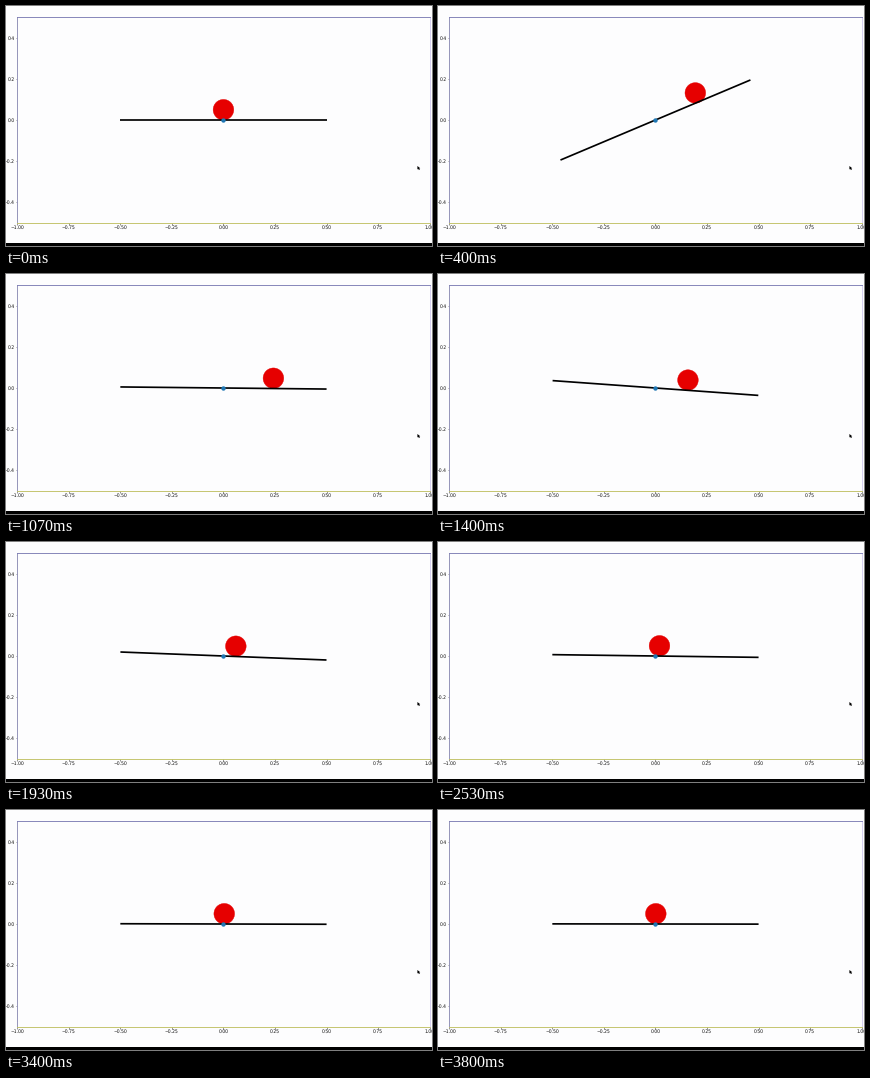
Recreate the animation shown at these times as a matplotlib script. Size 426x240 px, loop 3870 ms.

```python
import numpy as np
import matplotlib.pyplot as plt
from matplotlib.animation import FuncAnimation
from matplotlib.patches import Circle, Polygon, Rectangle

plt.rcParams["text.hinting"] = "no_hinting"

W, H, DPI = 426, 240, 100
FRAMES, LOOP = 58, 3870
STEP = LOOP / FRAMES
PX = 72 / DPI  # points per pixel
PAPER = "#fdfdfe"

# Ball on a beam: kicked once, then balanced by a limited PD controller
PULL = 5.2
KP, KD, LIMIT = 1.99, 1.42, 0.4
KICK_TIME, KICK_SPEED = 0.17, 1.146
HALF, RADIUS = 0.5, 0.05


def simulate():
    """Return the ball's place along the beam and the tilt for each frame."""
    sub = 60
    dt = STEP / 1000 / sub
    kick = round(KICK_TIME / dt)
    s = v = 0.0
    states = []
    for i in range(FRAMES * sub):
        if i == kick:
            v += KICK_SPEED
        tilt = np.clip(KP * s + KD * v, -LIMIT, LIMIT)
        if i % sub == 0:
            states.append((s, tilt))
        v -= PULL * np.sin(tilt) * dt
        s += v * dt
    return states


def number(digits):
    return lambda x, pos: f"{x:.{digits}f}".replace("-", "\u2212")


def px(x, y):
    return x / W, 1 - y / H


states = simulate()

fig = plt.figure(figsize=(W / DPI, H / DPI), dpi=DPI, facecolor=PAPER)
left, right, top, bottom = 11.2, 423.7, 11.2, 216.8
ax = fig.add_axes([left / W, 1 - bottom / H, (right - left) / W, (bottom - top) / H])
ax.set(xlim=(-1, 1), ylim=(-0.5, 0.5), facecolor=PAPER)
ax.set_xticks(np.linspace(-1, 1, 9))
ax.set_yticks([-0.4, -0.2, 0, 0.2, 0.4])
ax.xaxis.set_major_formatter(number(2))
ax.yaxis.set_major_formatter(number(1))
ax.tick_params(length=1.5 * PX, width=0.5 * PX, pad=1.0 * PX,
               labelsize=4.5 * PX, color="#303030", labelcolor="#101010")
for side, color in dict(top="#7c7cb4", left="#8c8cb4",
                        right="#d2ccee", bottom="#c0c064").items():
    ax.spines[side].set(color=color, linewidth=0.9 * PX)

# Window edge and mouse pointer
fig.add_artist(Rectangle((0, 0), 1, 3 / H, transform=fig.transFigure, color="black", lw=0))
pointer = [(411.4, 160.0), (414.2, 162.2), (413.2, 162.6), (413.8, 163.8),
           (412.9, 164.1), (412.3, 162.9), (411.4, 163.4)]
fig.add_artist(Polygon([px(*p) for p in pointer], transform=fig.transFigure,
                       color="black", lw=0))

ball = ax.add_patch(Circle((0, RADIUS), RADIUS, color="#e60000", lw=0.4 * PX, zorder=2))
beam, = ax.plot([], [], color="black", lw=1.7 * PX, solid_capstyle="butt", zorder=3)
ax.plot(0, 0, "o", color="#1f77b4", ms=4.4 * PX, mew=0, zorder=4)


def draw(i):
    s, tilt = states[i]
    c, n = np.cos(tilt), np.sin(tilt)
    beam.set_data([-HALF * c, HALF * c], [-HALF * n, HALF * n])
    ball.center = (s * c, s * n + RADIUS)
    return beam, ball


anim = FuncAnimation(fig, draw, frames=FRAMES, interval=STEP, repeat=True, repeat_delay=0)
plt.show()
```
